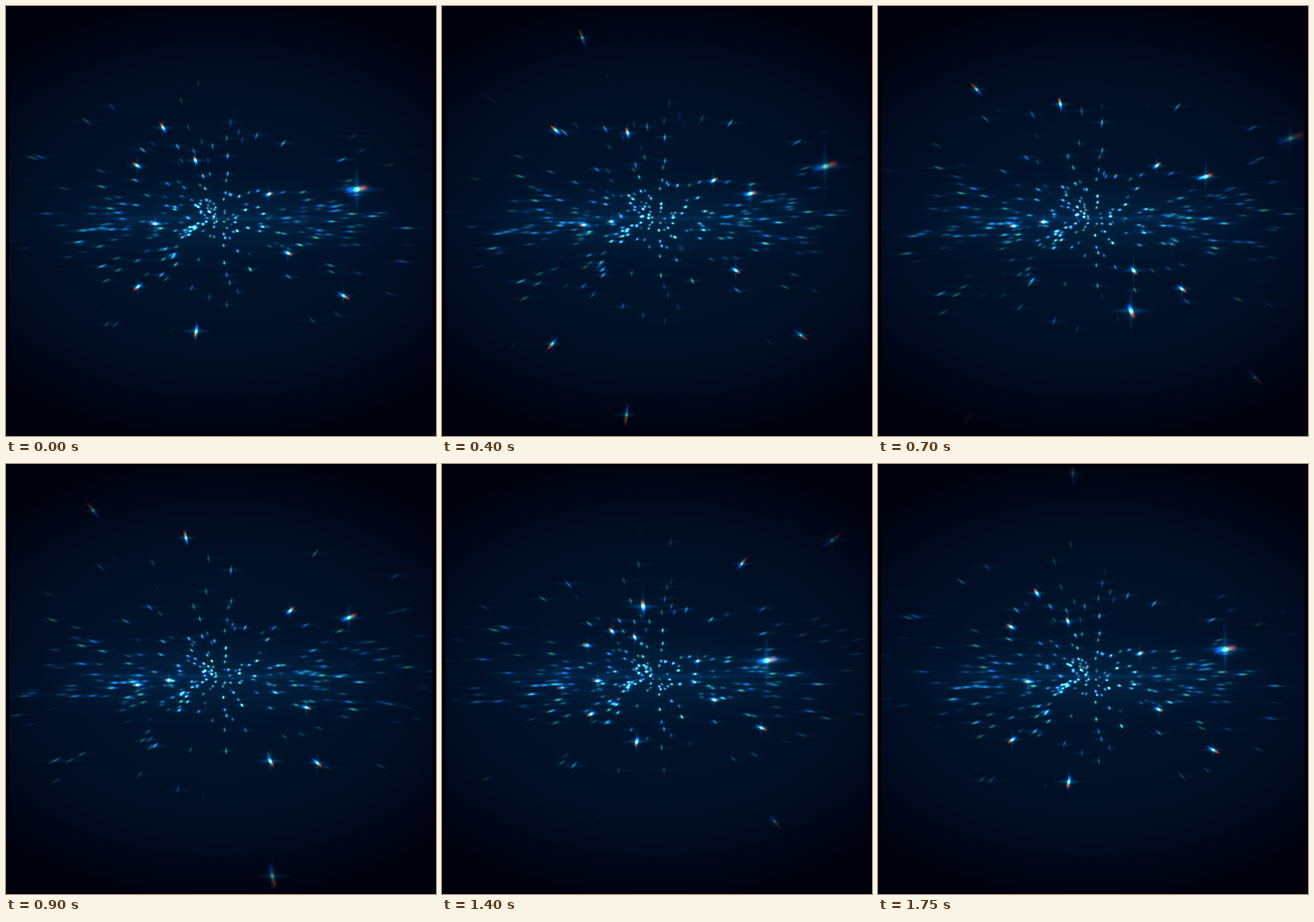
An HTML page with a canvas for the animation above (1800 ms loop, 498 by 498 pixels).

```html
<!DOCTYPE html>
<html lang="en">
<head>
<meta charset="utf-8">
<title>Star drift</title>
<style>
  html, body { margin: 0; width: 100%; height: 100%; overflow: hidden; background: #01020e; }
  canvas { display: block; }
</style>
</head>
<body>
<canvas width="498" height="498"></canvas>
<script>
const SIZE = 498, MID = 248, LOOP = 1.8, STEP = .05;
const ctx = document.querySelector('canvas').getContext('2d');

let seed = 41;
const rand = () => (seed = seed * 16807 % 2147483647) / 2147483647;
const sign = () => rand() < .5 ? -1 : 1;
const tints = [[.05, .25, .95], [.1, .85, .3], [.15, .7, .8], [.05, .5, .9]];

const stars = Array.from({ length: 160 }, () => ({
  x: sign() * (3 + 122 * rand() ** 1.35),
  y: sign() * (12 + 165 * rand() ** 1.6),
  phase: rand(),
  power: .25 + .65 * rand() ** 2,
  tint: tints[Math.floor(rand() * tints.length)]
}));

// Bright stars pass (x, y) from the centre at a time in s, growing at a rate per s
const hero = (time, x, y, rate, power = 1) => ({ time, x, y, rate, power });
const heroes = [
  hero(2.2, -116, -104, 1.25),
  hero(2.2, -33, -101, .95),
  hero(2, 176, -47, 1.4, 2.6),
  hero(2.3, 69, -51, 1.06),
  hero(1.75, -74, 4, .7),
  hero(1.8, -95, 77, 1.55),
  hero(1.75, -27, 120, 1.4, 1.3),
  hero(.7, 45, 105, 3.9, 2),
  hero(.9, 58, 96, 2.5, 1.3),
  hero(2.2, 92, 58, 1.05),
  hero(1.75, 140, 83, 1.05),
  hero(.9, 149, -70, 1.65, 1.5),
  hero(1.8, -66, -107, 1.7),
  hero(1.4, -15, -83, 3, 1.8)
];

function soft(rgb) {
  const g = ctx.createRadialGradient(0, 0, 0, 0, 0, 1);
  [[0, 1], [.4, .6], [.7, .18], [1, 0]].forEach(([at, a]) => g.addColorStop(at, `rgba(${rgb},${a})`));
  return g;
}
const channels = ['255,65,10', '50,235,60', '15,70,255'].map(soft);
const white = soft('225,240,235'), haze = soft('10,105,170');

function glow(x, y, rx, ry, angle, fill, alpha) {
  ctx.save();
  ctx.translate(MID + x, MID + y);
  ctx.rotate(angle);
  ctx.scale(rx, ry);
  ctx.globalAlpha = Math.max(0, Math.min(1, alpha));
  ctx.fillStyle = fill;
  ctx.fillRect(-1, -1, 2, 2);
  ctx.restore();
}

// Radial smear with red on the outside and blue on the inside
function prism(x, y, length, width, spread, tint, alpha) {
  const angle = Math.atan2(y, x);
  channels.forEach((fill, i) => {
    const d = (1 - i) * spread;
    glow(x + d * Math.cos(angle), y + d * Math.sin(angle), length, width, angle, fill, alpha * tint[i]);
  });
}

function drawStar(s, age) {
  const x = s.x / (1 - .75 * age), y = s.y * (.06 + age ** 1.5);
  const r = Math.hypot(x, y), near = Math.max(0, 1 - r / 75);
  const fade = s.power * Math.min(1, age * 9, (1 - age) * 4) * Math.max(0, 1 - (r / 260) ** 4);
  prism(x, y, 2.6 + r * .03, 2.2, .5 + r * .014, s.tint, fade * (1 + near * .3));
  glow(x, y, 4 + r * .14, 3, 0, haze, fade * .28);
  if (near) glow(x, y, 2.2, 2, 0, white, fade * near * 1.1);
}

function drawHero({ x: hx, y: hy, rate, power }, dt) {
  const life = Math.abs(dt * rate);
  if (life > 1.2) return;
  const x = hx * Math.exp(.38 * rate * dt), y = hy * Math.exp(rate * dt);
  const r = Math.hypot(x, y);
  const fade = Math.min(1, (1.2 - life) * 3) * Math.max(0, Math.min(1, (290 - r) / 130));
  glow(x, y, 15 * power, 2 + power, 0, haze, .4 * fade);
  glow(x, y, 1.5 + power, 15 * power, 0, haze, .3 * fade);
  glow(x, y, 7 * power, 6 * power, 0, haze, .25 * fade);
  const length = 2 + power * 1.7 + r * .015, width = 1.2 + power * 1.5;
  prism(x, y, length, width, .8 + r * .011 * (1 + power) , [.75, .65, .75], fade);
  glow(x, y, 1 + power * 1.6, .8 + power * 1.4, Math.atan2(y, x), white, .5 * fade);
}

function backdrop() {
  ctx.globalCompositeOperation = 'source-over';
  ctx.fillStyle = '#01020e';
  ctx.fillRect(0, 0, SIZE, SIZE);
  const g = ctx.createRadialGradient(0, 0, 0, 0, 0, 1);
  [[0, '#01152c'], [.45, '#011128'], [.72, '#010b1f'], [1, '#01020e']].forEach(stop => g.addColorStop(...stop));
  glow(0, 0, 370, 255, 0, g, 1);
}

function frame() {
  const t = Math.floor(performance.now() / 1000 / STEP) * STEP % LOOP;
  backdrop();
  ctx.globalCompositeOperation = 'lighter';
  glow(0, 0, 280, 60, 0, haze, .12);
  glow(0, -2, 245, 5, 0, haze, .14);
  // Every star lives for two loops, so two copies of it overlap
  for (const k of [0, 1]) {
    stars.forEach(s => drawStar(s, ((t / LOOP + s.phase) % 1 + k) / 2));
    heroes.forEach(h => drawHero(h, t + LOOP * k - h.time));
  }
  ctx.globalCompositeOperation = 'source-over';
  ctx.strokeStyle = '#01020c';
  ctx.lineWidth = 8;
  ctx.strokeRect(0, 0, SIZE, SIZE);
  requestAnimationFrame(frame);
}
frame();
</script>
</body>
</html>
```
